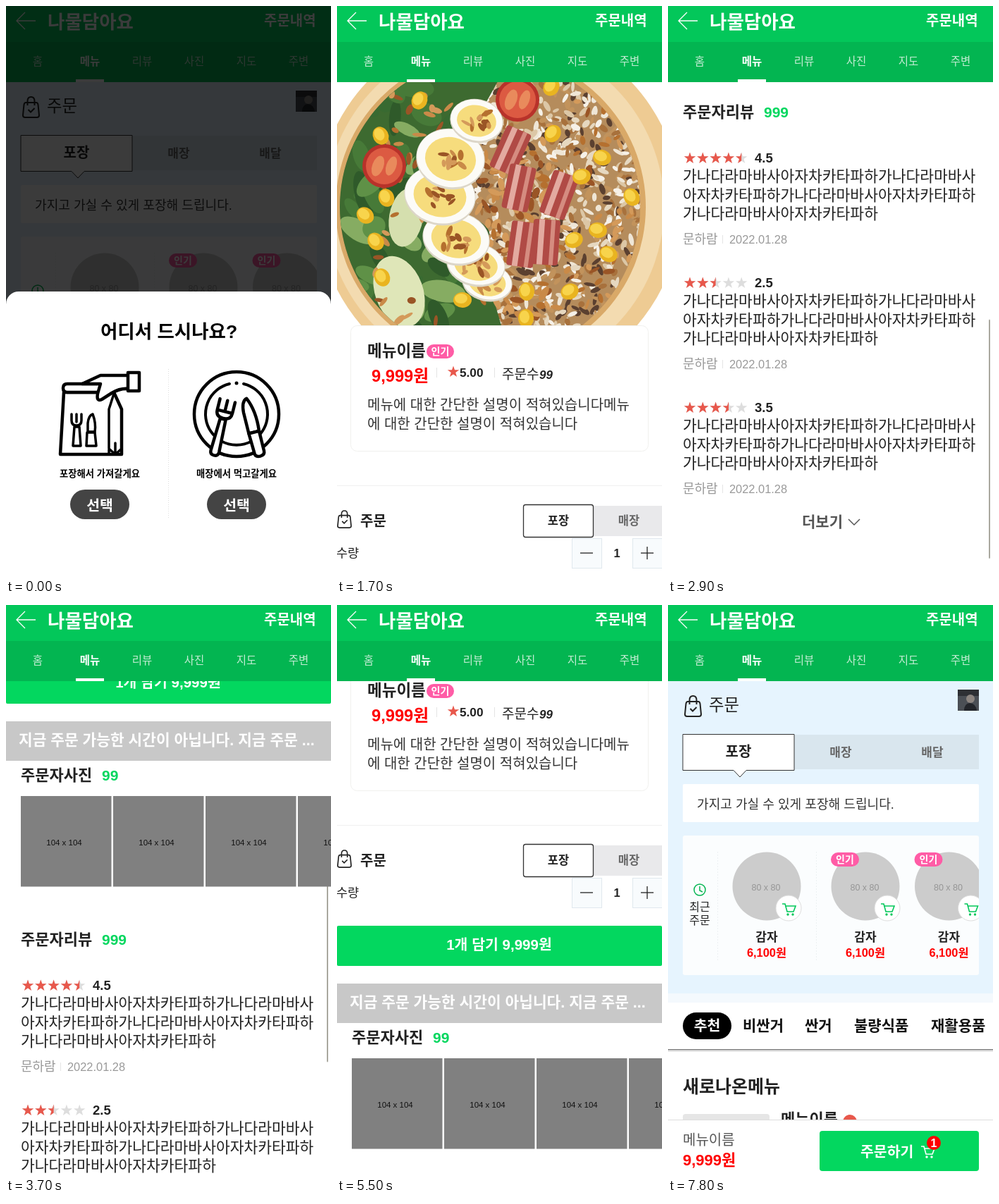
These frames come from a looping animation (461 px wide and 810 px high, 8000 ms). An HTML page:

```html
<!DOCTYPE html>
<html lang="ko">
<head>
<meta charset="utf-8">
<style>
html, body { margin: 0; width: 100%; height: 100%; overflow: hidden; background: #fff; }
svg { display: block; width: 461px; height: 810px; }
text { font-family: 'Liberation Sans', 'Noto Sans CJK KR', 'Noto Sans CJK', sans-serif; }
</style>
</head>
<body>
<svg id="stage" viewBox="0 0 461 810"></svg>
<script>
const LOOP = 8000;
const GREEN = '#03d75f', PINK = '#ff5ca6', RED = '#f00', STAR = '#e8584c', INK = '#222';

// ---- drawing helpers, all return markup ----
const text = (x, y, size, str, fill = INK, weight = 400, anchor = 'start', more = '') =>
  `<text x="${x}" y="${y}" font-size="${size}" fill="${fill}" font-weight="${weight}" text-anchor="${anchor}" ${more}>${str}</text>`;
const mid = (x, y, size, str, fill, weight) => text(x, y, size, str, fill, weight, 'middle');
const rect = (x, y, w, h, fill, r = 0, more = '') =>
  `<rect x="${x}" y="${y}" width="${w}" height="${h}" rx="${r}" fill="${fill}" ${more}/>`;
const circle = (x, y, r, fill, more = '') => `<circle cx="${x}" cy="${y}" r="${r}" fill="${fill}" ${more}/>`;
const oval = (x, y, rx, ry, fill, turn = 0) =>
  `<ellipse rx="${rx}" ry="${ry}" fill="${fill}" transform="translate(${x} ${y}) rotate(${turn})"/>`;
const line = (d, stroke = INK, w = 1, more = '') =>
  `<path d="${d}" fill="none" stroke="${stroke}" stroke-width="${w}" ${more}/>`;
const group = (id, body, more = '') => `<g id="${id}" ${more}>${body}</g>`;
const at = (x, y, body, turn = 0) => `<g transform="translate(${x} ${y}) rotate(${turn})">${body}</g>`;
const times = (n, fn) => Array.from({ length: n }, (_, i) => fn(i)).join('');

const pill = (x, y, w, label, fill = PINK) =>
  rect(x, y, w, 20, fill, 10) + mid(x + w / 2, y + 15, 14, label, '#fff', 700);
const bag = (x, y) => at(x, y,
  line('M4 8H19Q21 8 21.500 11L23 26Q23 29 20 29H3Q0 29 0 26L1.500 11Q2 8 4 8Z', INK, 2) +
  line('M6.500 12V6Q6.500 0 11.500 0Q16.500 0 16.500 6V12', INK, 2) + line('M7.500 18L11 21.500L16.500 16', INK, 2));
const cart = (x, y, color) => at(x, y,
  line('M0 0H4L7 11H16L19 3H5', color, 1.600) + circle(8, 15, 1.700, color) + circle(15, 15, 1.700, color));
const minus = (x, y, c = INK) => line(`M${x - 9} ${y}h18`, c, 1.300);
const plus = (x, y, c = INK) => minus(x, y, c) + line(`M${x} ${y - 9}v18`, c, 1.300);

const starPath = 'M' + Array.from({ length: 10 }, (_, i) => {
  const r = i % 2 ? 3.400 : 8.600, a = i * Math.PI / 5;
  return (r * Math.sin(a)).toFixed(2) + ' ' + (-r * Math.cos(a)).toFixed(2);
}).join('L') + 'Z';
const star = (x, y, fill) => `<path d="${starPath}" fill="${fill}" transform="translate(${x} ${y})"/>`;

// ---- header ----
const header = () =>
  rect(0, 0, 461, 51, '#03c75a') + rect(0, 51, 461, 57, '#03b551') +
  line('M27 9L15 21L27 33M15 21H42', '#fff', 1.300) +
  text(59, 32, 26.500, '나물담아요', '#fff', 700) +
  text(366, 28, 20, '주문내역', '#fff', 700) +
  ['홈', '메뉴', '리뷰', '사진', '지도', '주변'].map((s, i) =>
    mid(45 + 74 * i, 84, 15.500, s, i === 1 ? '#fff' : '#c3ecd4', i === 1 ? 700 : 400)).join('') +
  rect(99, 104, 40, 4, '#fff');

// ---- home ----
const recent = (x, hot) =>
  circle(x, 399, 48.500, '#ccc') + mid(x - 1, 405, 12.500, '80 x 80', '#969696') +
  circle(x + 31, 430, 18, '#fff', 'stroke="#ddd"') + cart(x + 22, 424, '#03c75a') +
  (hot ? pill(x - 49, 351, 40, '인기') : '') +
  mid(x, 477, 17, '감자', INK, 700) + mid(x, 499, 16.400, '6,100원', RED, 700);

const home = () =>
  rect(0, 0, 461, 810, '#fff') + rect(0, 108, 461, 443, '#e6f4fe') + rect(0, 551, 461, 13, '#f4f9fd') +
  bag(24, 129) + text(58, 150, 23.400, '주문', INK) +
  rect(411, 120, 30, 30, '#4b4f55') + rect(411, 120, 30, 9, '#2e3034') +
  `<path d="M420 150q0-10 8-11q9 1 10 11z" fill="#23252a"/>` + circle(429, 133, 6, '#8d8580') +
  rect(179, 184, 262, 49, '#d9e6ee') + mid(245, 215, 17, '매장', '#666', 700) + mid(375, 215, 17, '배달', '#666', 700) +
  `<path d="M21 183.500H179V234.500H111L102 244L93 234.500H21Z" fill="#fff" stroke="#333"/>` +
  mid(100, 215, 20, '포장', INK, 700) +
  rect(21, 254, 420, 54, '#fff', 2) + text(41, 289, 18.100, '가지고 가실 수 있게 포장해 드립니다.', '#333') +
  rect(21, 327, 420, 198, '#fbfdfe', 3) +
  line('M70.500 350V505M210.500 350V505', '#edf1f3', 1, 'stroke-dasharray="2 2"') +
  circle(45, 404, 8, 'none', 'stroke="#03b551" stroke-width="1.500"') + line('M45 399V405L49 407', '#03b551', 1.500) +
  mid(45, 434, 16, '최근', INK) + mid(45, 453, 16, '주문', INK) +
  `<g clip-path="url(#card)">${recent(140) + recent(280, true) + recent(398.500, true)}</g>` +
  rect(0, 564, 461, 67, '#fff') + rect(0, 630, 461, 1.500, '#777') + rect(0, 631.500, 461, 2, '#ddd') +
  rect(21, 578, 69, 38, '#000', 19) + mid(55.500, 604, 20.500, '추천', '#fff', 700) +
  [[106, '비싼거'], [194, '싼거'], [264, '불량식품'], [373, '재활용품']].map(([x, s]) =>
    text(x, 604, 21, s, '#111', 700)).join('') +
  text(21, 692, 25, '새로나온메뉴', INK, 700) +
  rect(21, 722, 123, 40, '#e6e6e6', 4) + text(160, 737, 22, '메뉴이름', INK, 700) + circle(258, 733, 10, STAR) +
  rect(0, 730, 461, 80, '#fff') + rect(0, 730, 461, 1, '#ddd') +
  text(21, 766, 20, '메뉴이름', '#555') + text(21, 795, 22, '9,999원', RED, 700) +
  rect(215, 746, 226, 57, GREEN, 4) + text(273, 783, 20.500, '주문하기', '#fff', 700) +
  cart(359, 768, '#fff') + circle(377, 763, 10, RED) + mid(377, 769, 16, '1', '#fff', 700);

// ---- salad picture ----
let seed = 11;
const rnd = (a, b) => (seed = seed * 16807 % 2147483647, a + (b - a) * seed / 2147483647);
const pick = list => list[Math.floor(rnd(0, list.length))];
const CRUMB = ['#b5702f', '#c98a48', '#9a5526', '#d49a5a'];
const LEAF = ['#2f5a2a', '#477a38', '#5f9147', '#386a31', '#86ac62'];
const GRAIN = ['#efe6d6', '#dcc7a6', '#f6f1e8', '#e6d8c0', '#c2935c', '#a8713c', '#5b4030'];
const scatter = (n, [x0, x1], [y0, y1], size, colors) => times(n, () =>
  oval(rnd(x0, x1), rnd(y0, y1), rnd(size * 0.600, size * 1.300), rnd(size * 0.300, size * 0.600), pick(colors), rnd(0, 180)));

const salad = () => {
  const grain = scatter(800, [195, 435], [108, 455], 7, GRAIN);
  const greens = `<path d="M0 100H232L165 220L235 460H0Z" fill="#3d6a30"/>` + scatter(60, [10, 190], [110, 455], 26, LEAF);
  const crumbs = scatter(100, [195, 300], [190, 440], 9, CRUMB) + scatter(70, [280, 425], [130, 430], 7, CRUMB) +
    scatter(40, [50, 160], [120, 450], 8, CRUMB);
  const bacon = [[246, 205, 24], [258, 258, 12], [315, 268, 20], [263, 338, 8], [296, 335, 4]].map(([x, y, a]) =>
    at(x, y, rect(-19, -32, 38, 64, '#b04a45', 4) + rect(-11, -32, 8, 64, '#e3aaa0') + rect(6, -32, 6, 64, '#d58c80'), a)).join('');
  const corn = [[62, 184], [70, 272], [40, 297], [55, 334], [64, 385], [117, 134], [347, 242], [385, 352], [330, 405],
    [269, 405], [418, 271], [306, 181], [370, 318], [268, 443], [178, 417], [376, 215], [304, 115], [336, 332]]
    .map(([x, y]) => oval(x, y, 13, 11, '#e9b420', x) + oval(x - 2, y - 2, 9, 7, '#f8d44c', x)).join('');
  const eggs = [[213, 392, 36, 27], [197, 367, 42, 31], [169, 330, 48, 38], [146, 269, 51, 42], [161, 217, 49, 43], [198, 163, 38, 31]]
    .map(([x, y, w, h]) => oval(x, y, w, h, '#dcd6c8', 12) + oval(x, y - 1, w - 1, h - 2, '#fcfbf7', 12) +
      oval(x, y, w * 0.740, h * 0.720, '#f6dc7d', 12) +
      scatter(11, [x - 18, x + 18], [y - 12, y + 14], 7, CRUMB)).join('');
  const tomato = [[67, 227], [256, 133]].map(([x, y]) =>
    circle(x, y, 31, '#b8322a') + circle(x, y, 26, '#dc5a42') + oval(x - 9, y, 8, 15, '#e98a5c', 20) + oval(x + 10, y, 7, 14, '#e98a5c', 20)).join('');
  return `<g clip-path="url(#photo)">` + circle(230, 285, 258, '#eecb93') + circle(224, 285, 240, '#f3dbb0') +
    circle(218, 285, 220, '#d9a968') +
    `<g clip-path="url(#bowl)">` + rect(0, 100, 461, 360, '#b58c5c') + grain + greens +
    oval(88, 405, 34, 52, '#dfe6b8', -20) + oval(98, 300, 24, 42, '#d5dfae', 10) +
    crumbs + bacon + tomato + eggs + corn + `</g></g>`;
};

// ---- detail ----
const detail = () =>
  salad() +
  rect(19.500, 453.500, 422, 178, '#fff', 9, 'stroke="#f0f0ee"') +
  text(43, 497, 22.500, '메뉴이름', INK, 700) + pill(127, 480, 39, '인기') +
  text(49, 533, 23.700, '9,999원', RED, 700) +
  line('M141.500 513V527M223.500 513V527', '#e4e4e4') +
  star(165, 519, STAR) + text(174, 526, 17.200, '5.00', INK, 700) +
  text(234, 529, 19, '주문수', INK) + text(287, 529, 17, '99', INK, 700, 'start', 'font-style="italic"') +
  text(43, 573, 20, '메뉴에 대한 간단한 설명이 적혀있습니다메뉴', '#333') +
  text(43, 600, 20, '에 대한 간단한 설명이 적혀있습니다', '#333') +
  rect(0, 680, 461, 1, '#f0f0f0') +
  `<g transform="translate(1 716) scale(.83)">${bag(0, 0)}</g>` +
  text(33, 738, 20, '주문', INK, 700) +
  rect(364, 709, 97, 43, '#e9e9eb') + mid(414, 736, 16.500, '매장', '#666', 700) +
  rect(264.500, 707.500, 99, 46, '#fff', 3, 'stroke="#333" stroke-width="1.300"') + mid(314, 736, 16.500, '포장', INK, 700) +
  text(-1, 782, 17.500, '수량', INK) +
  [333.500, 419.500].map(x => rect(x, 755.500, 42, 42, '#f8fbfd', 0, 'stroke="#e0e8ee"')).join('') +
  minus(354, 776) + plus(440, 776) + mid(397, 782, 16.500, '1', INK, 700) +
  rect(0, 823, 461, 57, GREEN, 2) + mid(230, 857, 20.500, '1개 담기 9,999원', '#fff', 700) +
  rect(0, 905, 461, 56, '#c8c8c8') + text(18, 939, 21.400, '지금 주문 가능한 시간이 아닙니다. 지금 주문 ...', '#fff', 700) +
  text(21, 989, 22, '주문자사진', INK, 700) + text(136, 989, 21, '99', GREEN, 700) +
  text(21, 1222, 22, '주문자리뷰', INK, 700) + text(136, 1222, 21, '999', GREEN, 700) +
  [4.500, 2.500, 3.500].map((score, i) => at(0, 177 * i, review(score))).join('') +
  text(190, 1803, 21, '더보기', '#555', 700) + line('M256 1792l8 8l8-8', '#555', 1.500);

const SYL = '가나다라마바사아자차카타파하';
const review = score =>
  times(5, i => star(31 + 18.300 * i, 1280, '#ddd') +
    (score >= i + 1 ? star(31 + 18.300 * i, 1280, STAR)
      : score > i ? `<g clip-path="url(#half)" transform="translate(${31 + 18.300 * i} 1280)">${star(0, 0, STAR)}</g>` : '')) +
  text(123, 1286, 18.500, score.toFixed(1), INK, 700) +
  [SYL + SYL.slice(0, 7), SYL.slice(7) + SYL, SYL].map((s, i) => text(21, 1313 + 26.500 * i, 21.500, s, INK)).join('') +
  text(21, 1401, 18, '문하람', '#999') + line('M77.500 1389V1401', '#e4e4e4') + text(87, 1401, 16.400, '2022.01.28', '#999');

const gallery = () => times(4, i =>
  rect(21 + 131 * i, 1011, 128.500, 128.500, '#808080') + mid(82.500 + 131 * i, 1081, 11.500, '104 x 104', '#111'));

// ---- cart sheet, resting at its final place ----
const SHEET_TOP = 285;
const sheet = () => at(0, SHEET_TOP,
  `<path d="M0 600V5${times(27, () => 'l8.540-8l8.540 8')}V600Z" fill="#fff"/>` +
  circle(64, 71, 42.500, '#e8e7e3') + mid(66, 77, 11.500, '70 x 70', '#333') +
  text(127, 51, 23.500, '메뉴 이름', INK, 700) + pill(230, 32, 43, '포장', '#333') +
  line('M425 25L439 39M439 25L425 39', INK, 1.500) +
  [127.500, 214.500].map(x => rect(x, 72.500, 41, 41, '#fff', 0, 'stroke="#ddd" stroke-dasharray="2 2"')).join('') +
  minus(148, 93, '#456') + plus(235, 93) + mid(192, 100, 19, '1', INK) +
  rect(0, 140, 461, 1, '#eee') + text(21, 178, 19, '추가선택', INK, 700) +
  ['기본', '곱빼기', '반반'].map((s, i) => text(21, 237 + 44 * i, 18, s, '#444') +
    circle(424, 230 + 44 * i, 15, '#fff', 'stroke="#ccc"')).join('') +
  rect(0, 380, 461, 1, '#eee') + text(21, 428, 19, '합계', INK, 700) + text(440, 428, 22, '9,999원', RED, 700, 'end') +
  rect(0, 460, 461, 57, GREEN, 2) + mid(230, 495, 20.500, '1개 담기 9,999원', '#fff', 700));

// ---- question panel ----
const bold = (d, w = 4.500) =>
  `<path d="${d}" fill="#fff" stroke="#000" stroke-width="${w}" stroke-linejoin="round" stroke-linecap="round"/>`;
const takeout = () =>
  bold('M82 548L77 636H164V572L153 548Z') + bold('M153 550L146 572V636M146 628L155 636L164 628M155 620V636', 3.500) +
  bold('M140 548H87Q81 548 81 542Q81 536 87 536H130') +
  bold('M173 524H134L108 536H134L130 550Q128 562 136 558L150 549Q162 542 173 543') + bold('M173 520H189V546H173Z') +
  bold('M93 579V588Q93 595 100 595Q107 595 107 588V579M100 579V590', 3.500) + bold('M97 597L95 624H106L104 597Z', 3.500) +
  bold('M116 604V592Q117 581 123 579Q128 592 126 604Z', 3.500) + bold('M115 605L114 624H128L126 605Z', 3.500);
const plate = () =>
  circle(327, 579, 60, 'none', 'stroke="#000" stroke-width="4.500"') +
  bold('M317 536A44 44 0 1 0 337 536', 4) + circle(327, 535, 2.500, '#000') +
  at(308, 585, bold('M-11-26V-10Q-11 0 0 0Q11 0 11-10V-26M0-26V-10M-11-10H11') + bold('M-4 1L-6 48Q-6 54 0 54Q6 54 6 48L4 1Z'), 14) +
  at(350, 600, bold('M-7 5V-26Q-6-42 2-44Q11-24 8 5Z') + bold('M-7 5H8V34Q8 40 1 40Q-6 40-6 34Z'), -14);
const choice = (x, label) =>
  mid(x, 668, 13.300, label, '#000', 700) + rect(x - 42, 686, 84, 42, '#444', 21) + mid(x, 715.500, 20.500, '선택', '#fff', 700);
const panel = () =>
  rect(0, 405, 461, 440, '#fff', 18) + mid(231, 471, 26.500, '어디서 드시나요?', '#000', 700) +
  line('M230.500 515V728', '#ddd', 1, 'stroke-dasharray="1 2"') +
  takeout() + plate() + choice(133, '포장해서 가져갈게요') + choice(327, '매장에서 먹고갈게요');

const clip = (id, shape) => `<clipPath id="${id}">${shape}</clipPath>`;
document.getElementById('stage').innerHTML =
  '<defs>' + clip('card', rect(21, 327, 420, 198, '#000')) + clip('photo', rect(0, 108, 461, 346, '#000')) +
  clip('bowl', circle(217, 285, 213, '#000')) + clip('half', rect(-9, -9, 9, 18, '#000')) + '</defs>' +
  group('home', home()) +
  group('detail', rect(0, 0, 461, 810, '#fff') + group('page', detail()) +
    group('thumb', rect(455, 0, 2, 339, '#aaa89f', 1)) + group('photos', gallery())) +
  header() + group('dim', rect(0, 0, 461, 810, '#000')) + group('sheet', sheet()) + group('panel', panel());

// ---- timeline: [ms, value] pairs, each value holds until the next ----
const play = (id, prop, steps, css = v => v) => {
  const frames = [...steps, [LOOP, steps[steps.length - 1][1]]].map(([ms, v]) =>
    ({ offset: ms / LOOP, [prop]: css(v), easing: 'step-end' }));
  document.getElementById(id).animate(frames, { duration: LOOP, iterations: Infinity });
};
const shift = v => `translateY(${v}px)`;

const scroll = [[0, 0], [2200, 60], [2300, 200], [2400, 338], [2500, 470], [2600, 620], [2700, 780], [2800, 930],
  [2900, 1064], [3000, 1128], [3400, 1064], [3500, 960], [3600, 855], [3700, 740], [3800, 590], [3900, 440], [4000, 368]];
play('page', 'transform', scroll, v => shift(-v));
play('photos', 'transform', scroll, v => shift(-v));
play('thumb', 'transform', scroll, v => shift(v * 0.418));
play('thumb', 'opacity', [[0, 0], [2200, 1], [3100, 0], [3400, 1], [4200, 0]]);
play('home', 'opacity', [[0, 1], [1700, 0], [6400, 1]]);
play('detail', 'opacity', [[0, 0], [1700, 1], [6400, 0]]);
play('dim', 'opacity', [[0, 0.77], [500, 0], [4200, 0.09], [4300, 0.19], [4400, 0.29], [4500, 0.39], [4600, 0.52],
  [4700, 0.65], [4800, 0.77], [5500, 0], [6400, 0.39], [6500, 0.77], [7800, 0]]);
play('sheet', 'transform', [[0, 600], [4400, 490], [4500, 390], [4600, 220], [4700, 70], [4800, 0], [5500, 600]], shift);
play('panel', 'transform', [[0, 0], [500, 450], [6400, 190], [6500, 0], [7800, 450]], shift);
</script>
</body>
</html>
```
